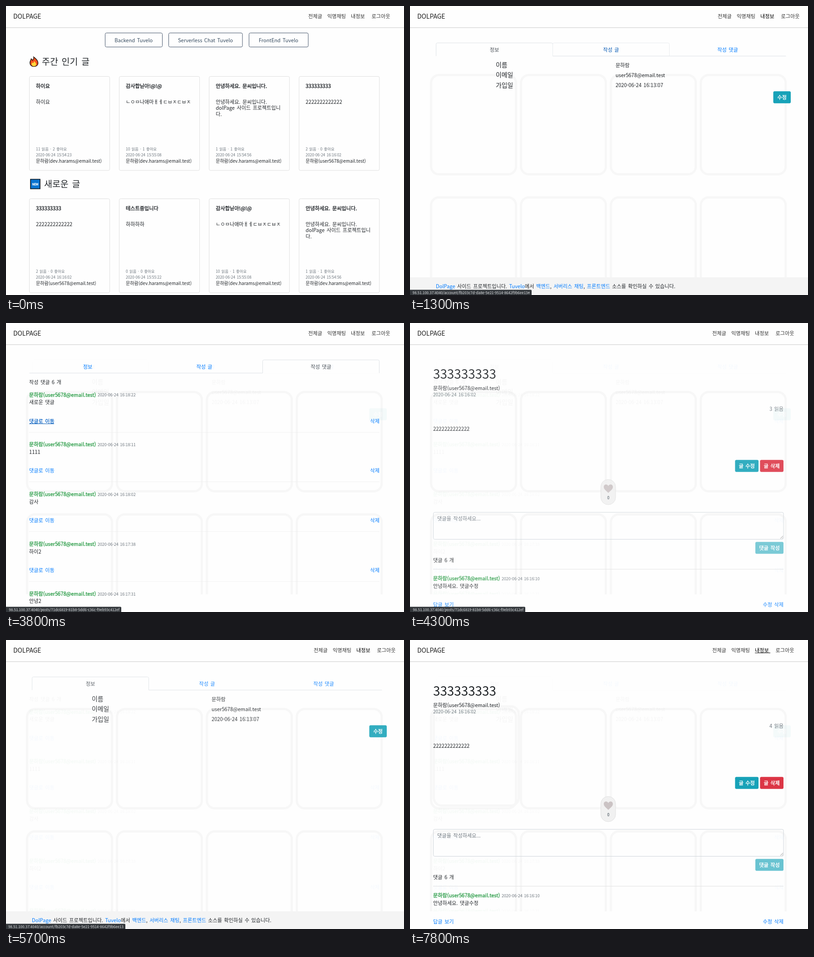
Animation, 877 px wide and 638 px high, one loop 8 s. Source, as an HTML page:

```html
<!DOCTYPE html>
<html lang="ko">
<head>
<meta charset="utf-8">
<title>DOLPAGE</title>
<style>
html, body { margin: 0; width: 100%; height: 100%; overflow: hidden; background: #fefefe; }
svg { display: block; }
text { font-family: "Noto Sans CJK KR", "Noto Sans KR", "Noto Sans CJK JP", "Noto Sans", sans-serif; word-spacing: .12em; white-space: pre; }
</style>
</head>
<body>
<svg id="stage" width="877" height="638" viewBox="0 0 877 638">
  <defs><clipPath id="aboveFooter"><rect width="877" height="599"/></clipPath></defs>
</svg>
<script>
const LOOP = 8000, SIZE = 11.13;
const INK = '#212529', GRAY = '#6c757d', BLUE = '#007bff', DARK_BLUE = '#0056b3',
      TEAL = '#17a2b8', RED = '#dc3545', GREEN = '#2f9e4b', LINE = '#dee2e6';
const NAME = '문하람', DEV = NAME + '(dev.harams@email.test)', USER = NAME + '(user5678@email.test)';
const stage = document.getElementById('stage');

function el(parent, tag, attrs = {}) {
  const node = document.createElementNS('http://www.w3.org/2000/svg', tag);
  for (const key in attrs) node.setAttribute(key, attrs[key]);
  parent.append(node);
  return node;
}
const group = (parent, attrs) => el(parent, 'g', attrs);
const rect = (p, x, y, width, height, attrs) => el(p, 'rect', { x, y, width, height, ...attrs });
const path = (p, d, stroke = LINE, attrs) => el(p, 'path', { d, stroke, fill: 'none', ...attrs });

function text(p, x, y, content, { size = SIZE, fill = INK, anchor = 'start', bold = false } = {}) {
  const node = el(p, 'text', { x, y, fill, 'font-size': size, 'text-anchor': anchor });
  if (bold) { node.setAttribute('stroke', fill); node.setAttribute('stroke-width', .4); }
  node.textContent = content;
  return node;
}
function button(p, x, y, w, h, label, fill) {
  rect(p, x, y, w, h, { rx: 3, fill });
  text(p, x + w / 2, y + h / 2 + 4.3, label, { fill: '#fff', anchor: 'middle', bold: true });
}
function card(p, x, y, title, lines, meta, time, author) {
  rect(p, x, y, 177, 207.5, { rx: 3, fill: '#fefefe', stroke: '#dfdfdf' });
  const tx = x + 14.5;
  text(p, tx, y + 25.7, title, { bold: true });
  lines.forEach((line, i) => text(p, tx, y + 60.5 + i * 13.3, line));
  text(p, tx, y + 163.7, meta, { size: 8.35, fill: GRAY });
  text(p, tx, y + 176, '2020-06-24 ' + time, { size: 8.35, fill: GRAY });
  text(p, tx, y + 190, author, { size: 10.02 });
}
function cardRing(p, x, y) {
  return rect(p, x - 5, y - 3, 187, 219, { rx: 17, fill: 'none', stroke: '#f7f7f7', 'stroke-width': 5 });
}

// Tab bar; returns a function that highlights one inactive tab (-1 for none).
function tabBar(p, left, active) {
  const W = 257, frame = x => `M${x} 110.5V84.5q0-3 3-3h${W - 6}q3 0 3 3V110.5`;
  const ax = left + active * W;
  path(p, `M${left} 110.5H${ax}M${ax + W} 110.5H${left + 3 * W}`);
  path(p, frame(ax));
  const tabs = ['정보', '작성 글', '작성 댓글'].map((label, i) => ({
    border: path(p, frame(left + i * W), '#e9ecef', { visibility: 'hidden' }),
    label: text(p, left + (i + .5) * W, 100.5, label, { fill: i === active ? '#495057' : BLUE, anchor: 'middle' })
  }));
  return hover => tabs.forEach((tab, i) => {
    if (i === active) return;
    tab.border.setAttribute('visibility', i === hover ? 'inherit' : 'hidden');
    tab.label.setAttribute('fill', i === hover ? DARK_BLUE : BLUE);
  });
}

// Faint remains of pages already left
const ghosts = group(stage, { 'clip-path': 'url(#aboveFooter)' });
const rings = group(ghosts);
const cardX = i => 51.5 + i * 198.1;
for (const y of [155.5, 425.5]) for (let i = 0; i < 4; i++) cardRing(rings, cardX(i), y);
const infoGhost = el(ghosts, 'use', { href: '#info', opacity: .04 });
const listGhost = el(ghosts, 'use', { href: '#comments', opacity: .04 });
const cardGhost = cardRing(ghosts, 57.5, 149.5);

// Home
const home = group(stage);
[[218, 126.5, 'Backend Tuvelo'], [358, 163, 'Serverless Chat Tuvelo'], [535, 131, 'FrontEnd Tuvelo']].forEach(([x, w, label]) => {
  rect(home, x + .5, 59.5, w - .5, 31, { rx: 3, fill: 'none', stroke: '#44546a' });
  text(home, x + w / 2, 79.8, label, { fill: '#34495e', anchor: 'middle' });
});
path(home, 'M61 112.5C64 115 70.500 119 70.500 125.500C70.500 131 66.500 133.500 61.500 133.500C56 133.500 52.800 130 52.800 125.500C52.800 121 55 120 55.500 116.500C57 117.500 58 118.500 58.500 120C60.500 118 61.500 115 61 112.500Z',
  '#2b1a12', { fill: '#f4511e', 'stroke-width': 1.5 });
path(home, 'M62 121C63 124 66.500 125 66.500 128.500C66.500 131.500 64.500 133 61.500 133C58.500 133 56.500 131 56.500 128.500C56.500 126.500 57.500 125.500 58 124.500L60 126Q62 124 62 121Z',
  'none', { fill: '#ffd93b' });
text(home, 79, 130, '주간 인기 글', { size: 19.47 });
rect(home, 54, 382.5, 21, 21, { fill: '#0a74d1', stroke: '#101820', 'stroke-width': 1.6 });
text(home, 64.5, 395.6, 'NEW', { size: 6.2, fill: '#fff', anchor: 'middle', bold: true });
text(home, 84, 399.6, '새로운 글', { size: 19.47 });

const hello = ['안녕하세요. 문씨입니다.', ['안녕하세요. 문씨입니다.', 'dolPage 사이드 프로젝트입니', '다.'], '1 읽음 · 1 좋아요', '15:54:56', DEV];
const thanks = ['감사합닏아!@!@', ['ㄴㅇㅁ나애마ㅐㅔㄷㅂㅈㄷㅂㅈ'], '10 읽음 · 1 좋아요', '15:55:08', DEV];
const threes = views => ['333333333', ['2222222222222'], views + ' 읽음 · 0 좋아요', '16:16:02', USER];
[['하이요', ['하이요'], '11 읽음 · 2 좋아요', '15:54:23', DEV], thanks, hello, threes(2)]
  .forEach((c, i) => card(home, cardX(i), 155.5, ...c));
[threes(2), ['테스트중입니다', ['하하하하'], '0 읽음 · 0 좋아요', '15:55:22', DEV], thanks, hello]
  .forEach((c, i) => card(home, cardX(i), 425.5, ...c));

// Account: personal information
const account = group(stage);
const info = group(account, { id: 'info' });
const hoverInfoTab = tabBar(info, 57.5, 0);
[['이름', NAME], ['이메일', 'user5678@email.test'], ['가입일', '2020-06-24 16:13:07']].forEach(([label, value], i) => {
  text(info, 189, 135.2 + i * 22.2, label, { size: 13.9 });
  text(info, 453, 134.6 + i * 22.2, value);
});
button(info, 800.5, 188.3, 38.5, 26.5, '수정', TEAL);

// Account: own posts
const posts = group(stage);
const hoverPostsTab = tabBar(posts, 57.5, 1);
const postList = group(posts);
text(postList, 57, 134.6, '작성 글 1 개');
const lift = cardRing(postList, 57.5, 149.5);
card(postList, 57.5, 149.5, ...threes(3));

// Account: own comments
const commentPage = group(stage);
const hoverCommentsTab = tabBar(commentPage, 51.5, 2);
const commentFade = group(commentPage);
const comments = group(commentFade, { id: 'comments' });
function commentHead(p, y, time, body) {
  text(p, 51, y, USER, { fill: GREEN, bold: true });
  text(p, 202, y - .3, '2020-06-24 ' + time, { size: 8.9, fill: GRAY });
  text(p, 51, y + 16.5, body);
}
text(comments, 51, 134.6, '작성 댓글 6 개');
[['새로운 댓글', '18:22'], ['1111', '18:11'], ['감사', '18:02'], ['하이2', '17:38'], ['안녕2', '17:31']].forEach(([body, time], i) => {
  const y = 162.6 + i * 109.8;
  commentHead(comments, y, '16:' + time, body);
  text(comments, 51, y + 58, '댓글로 이동', { fill: BLUE });
  text(comments, 823, y + 58, '삭제', { fill: BLUE, anchor: 'end' });
  path(comments, `M51 ${Math.round(y + 78) + .5}H823`, '#ececec', { 'stroke-dasharray': '2 1' });
});
const linkHover = group(commentFade);
text(linkHover, 51, 220.6, '댓글로 이동', { fill: DARK_BLUE });
path(linkHover, 'M51 222.500H106', DARK_BLUE);

// Single post
const post = group(stage);
text(post, 51, 123.3, '333333333', { size: 27.82 });
text(post, 51, 147.8, USER);
text(post, 51, 162.4, '2020-06-24 16:16:02', { size: 10.02, fill: GRAY });
const views = text(post, 823, 193.8, '', { fill: GRAY, anchor: 'end' });
text(post, 51, 237.5, '2222222222222');
button(post, 716.3, 302.3, 51.7, 26.5, '글 수정', TEAL);
button(post, 771.3, 302.3, 51.7, 26.5, '글 삭제', RED);
rect(post, 420.5, 345.5, 32.5, 55.5, { rx: 16, fill: '#f1f1f1', stroke: '#e0e0e0' });
path(post, 'M437 375C432 370 427 367 427 362C427 358 429.500 356.500 432 356.500C434.500 356.500 436 358 437 360C438 358 439.500 356.500 442 356.500C444.500 356.500 447 358 447 362C447 367 442 370 437 375Z',
  'none', { fill: '#cbc3c4' });
text(post, 437, 389.3, '0', { size: 8.35, fill: GRAY, anchor: 'middle', bold: true });
rect(post, 51.5, 418, 771.5, 59.5, { rx: 3, fill: 'none', stroke: '#ced4da' });
text(post, 60, 435.6, '댓글을 작성하세요...', { fill: GRAY });
path(post, 'M816 476L822 470M819.500 476L822 473.500', '#777', { 'stroke-width': .8 });
button(post, 761, 483.2, 62, 26.3, '댓글 작성', '#69c3d1');
text(post, 51, 528, '댓글 6 개');
path(post, 'M51 543.500H823', '#e1e1e1');
commentHead(post, 568, '16:16:10', '안녕하세요. 댓글수정');
text(post, 51, 625.8, '답글 보기', { fill: BLUE });
text(post, 823, 625.8, '수정 삭제', { fill: BLUE, anchor: 'end' });

// Footer
const footer = group(stage);
rect(footer, 0, 599, 877, 39, { fill: '#f4f4f4' });
const footerText = text(footer, 57, 623, '');
['DolPage', ' 사이드 프로젝트입니다. ', 'Tuvelo', '에서 ', '백엔드', ', ', '서버리스 채팅', ', ', '프론트엔드', ' 소스를 확인하실 수 있습니다.']
  .forEach((part, i) => { el(footerText, 'tspan', { fill: i % 2 ? INK : BLUE }).textContent = part; });

// Header
rect(stage, 0, 0, 877, 47, { fill: '#fefefe' });
path(stage, 'M0 47.500H877', '#d9d9d9');
path(stage, 'M0 48.500H877', '#eeeeee');
text(stage, 16, 27.8, 'DOLPAGE', { size: 13.9, fill: '#1a1a1a' });
const nav = group(stage);
const [, , myInfo] = [[666, '전체글'], [708, '익명채팅'], [760, '내정보'], [805.5, '로그아웃']]
  .map(([x, label]) => text(nav, x, 26.8, label, { fill: '#333' }));
const navUnderline = path(nav, 'M760 28.500H794', '#111');

// Browser status bar
const status = group(stage);
const statusBox = path(status, '', 'none', { fill: '#33373b' });
const statusText = text(status, 0, 636, '', { size: 8, fill: '#dfe1e4', anchor: 'end' });
const HOST = '98.51.100.37:4040', ACCOUNT_URL = HOST + '/account/fb203c7d-da8e-5e21-9514-8642f9b6ee13';
const STATUS = {
  account: [ACCOUNT_URL, 263],
  tab: [ACCOUNT_URL + '#', 268],
  post: [HOST + '/posts/71dc6819-81b8-5dd6-c36c-f9eb93c412ef', 254]
};

const show = (node, on) => node.setAttribute('display', on ? 'inline' : 'none');
const fade = (t, start, duration) =>
  1 - .7 * Math.pow(1 - Math.min(1, Math.max(0, (t - start) / duration)), 1.6);
const latest = (steps, t) => steps.filter(step => step[0] <= t).pop();
const within = (t, from, to) => t >= from && t < to;

// start, page, fade duration
const PAGES = [[0, 'home', 1], [600, 'account', 300], [1500, 'posts', 200], [2300, 'comments', 200],
  [4100, 'post', 300], [5500, 'account', 300], [6000, 'posts', 200], [7100, 'post', 300]];
const TAB_HOVERS = [[0, -1], [1100, 2], [1200, 1], [1500, -1], [2000, 2], [2300, -1], [2700, 1], [2800, -1], [5900, 1], [6000, -1]];
const STATUS_STEPS = [[0, ''], [500, 'account'], [1200, 'tab'], [3800, 'post'], [4700, ''], [5500, 'account'],
  [5900, 'tab'], [6300, 'post'], [7300, '']];

function draw(time) {
  const t = Math.floor(time / 100) * 100;
  const [start, page, duration] = latest(PAGES, t);
  const opacity = start ? fade(t, start, duration) : 1;
  const wide = page === 'account' || page === 'posts';

  show(home, page === 'home');
  home.setAttribute('opacity', t >= 500 ? .35 : 1);
  show(account, page === 'account');
  show(posts, page === 'posts');
  show(commentPage, page === 'comments');
  show(post, page === 'post');
  show(footer, wide);
  account.setAttribute('opacity', opacity);
  postList.setAttribute('opacity', opacity);
  commentFade.setAttribute('opacity', opacity);
  post.setAttribute('opacity', opacity);
  views.textContent = (t < 6000 ? 3 : 4) + ' 읽음';

  const tab = latest(TAB_HOVERS, t)[1];
  hoverInfoTab(page === 'account' ? tab : -1);
  hoverPostsTab(tab);
  hoverCommentsTab(tab);
  show(linkHover, t >= 3800);
  show(lift, t >= 6300);

  show(rings, t >= 600);
  show(infoGhost, t >= 1500 && page !== 'account');
  show(listGhost, t >= 4100);
  show(cardGhost, t >= 7100);

  const hovered = within(t, 400, 1100) || within(t, 5200, 5600) || t >= 7800;
  nav.setAttribute('transform', `translate(${wide ? 12 : 0} 0)`);
  show(navUnderline, hovered);
  myInfo.setAttribute('fill', hovered || page === 'account' ? '#000' : '#333');

  const url = latest(STATUS_STEPS, t)[1];
  show(status, url);
  status.setAttribute('opacity', within(t, 4600, 4700) ? .5 : 1);
  if (url) {
    const [label, right] = STATUS[url];
    statusBox.setAttribute('d', `M0 626.5H${right - 2}q2 0 2 2V638H0Z`);
    statusText.setAttribute('x', right - 4);
    statusText.textContent = label;
  }
}

function tick() {
  draw(performance.now() % LOOP);
  requestAnimationFrame(tick);
}
tick();
</script>
</body>
</html>
```
